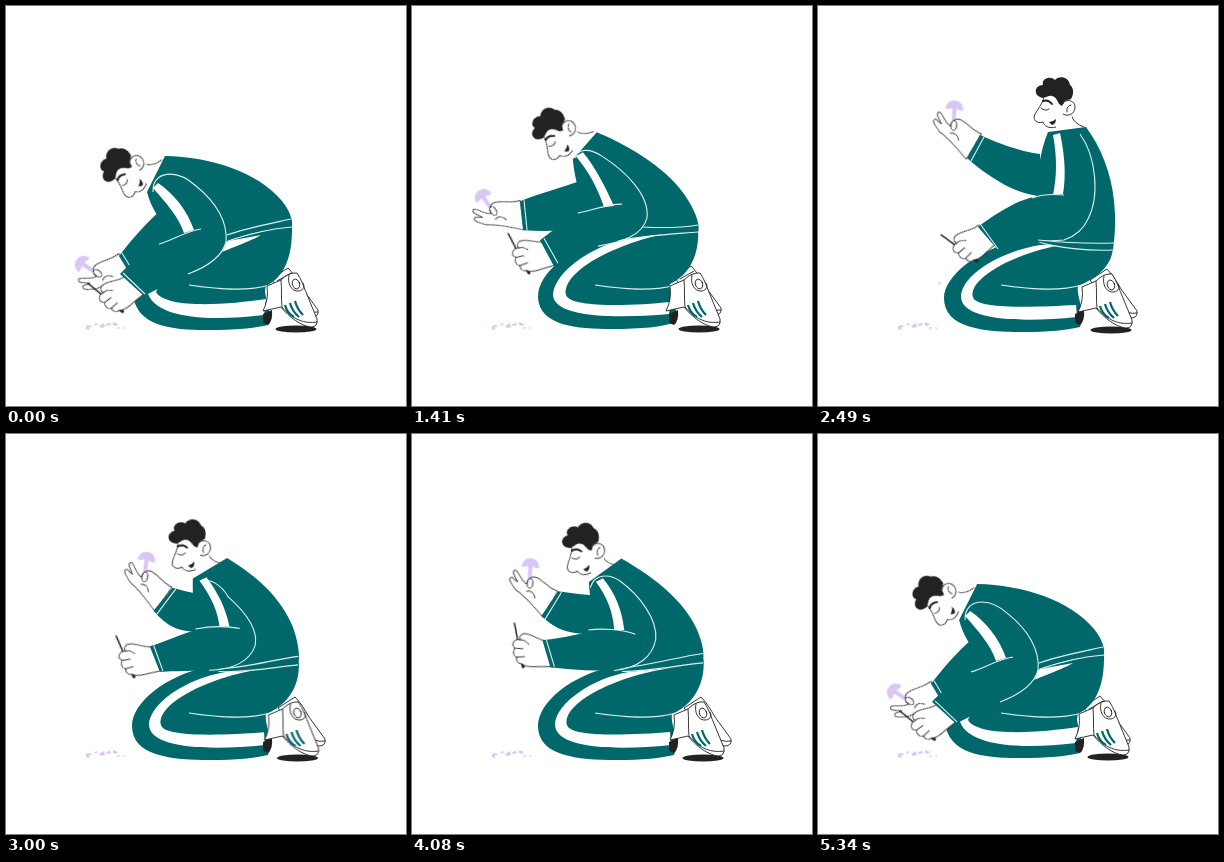
Recreate the animation shown at these times as an HTML page without scripts. Size 400 px wide and 400 px high, loop 5370 ms.

```html
<!DOCTYPE html>
<html lang="en">
<head>
<meta charset="utf-8">
<title>Mushroom picker</title>
<style>
html, body { margin: 0; width: 100%; height: 100%; overflow: hidden; background: #fff; }
svg { display: block; width: 100%; height: 100%; }
.teal { fill: #00686b; }
.ink { fill: #222; }
.lilac { fill: #d9c6f5; }
.white { fill: #fff; }
.skin { fill: #fff; stroke: #222; stroke-width: .9; stroke-linejoin: round; }
.pen { fill: none; stroke: #222; stroke-width: .9; stroke-linecap: round; }
.seam { fill: none; stroke: #dcf0ef; stroke-width: 1.1; }
.move { animation: 5.37s cubic-bezier(.4,0,.6,1) infinite; }
#legs { animation-name: legs; }
#band { animation-name: band; }
#torso { animation-name: torso; }
#hem { animation-name: hem; }
#arm { animation-name: arm; }
#folds { animation-name: folds; }
#sleeve { animation-name: sleeve; }
#far { animation-name: far; }
#cuff { animation-name: cuff; }
#head { animation-name: head; }
#fist { animation-name: fist; }
#palm { animation-name: palm; }
#shoe, #shade { animation-name: shoe; }
#heel { animation-name: heel; }
#chip { animation-name: chip; }

@keyframes legs {
  0%,100% { d: path("M200 240C160 250 127 270 127 288C130 320 165 324 200 324C230 324 250 322 262 319C268 305 256 290 260 280C276 272 287 255 286 218Z") }
  17.3% { d: path("M200 236C160 246 126 270 126 290C128 319 165 323 200 323C230 323 250 321 264 316C268 303 254 288 256 276C274 268 285 250 284 208Z"); animation-timing-function: ease-in }
  26.3% { d: path("M200 232C160 240 126 266 126 291C127 320 165 323 200 323C230 323 250 321 264 316C268 304 256 290 258 278C276 270 288 250 286 222Z"); animation-timing-function: ease-out }
  46.4% { d: path("M200 235C160 243 126 270 126 292C126 322 165 326 205 326C230 326 250 324 262 321C268 305 258 290 260 280C280 272 296 258 295 238Z") }
  60.5%,67% { d: path("M200 233C160 241 126 268 126 292C126 322 165 326 205 326C230 326 250 324 262 321C268 305 258 290 260 280C280 272 294 252 292 225Z") }
  85.5% { d: path("M200 233C160 241 126 268 126 292C126 322 165 326 205 326C230 326 250 324 262 321C268 305 258 290 260 280C278 272 293 252 291 225Z") }
}
@keyframes band {
  0%,100% { d: path("M255 229C238 240 160 262 150 286C160 303 220 299 260 293L258 309C200 316 146 312 141 284C150 262 190 250 222 235Z") }
  17.3% { d: path("M252 222C238 236 160 262 149 287C160 303 220 299 258 294L257 308C200 315 145 312 140 285C150 262 190 248 222 231Z"); animation-timing-function: ease-in }
  26.3% { d: path("M252 228C200 239 150 266 154 289C158 302 220 300 258 296L257 308C200 313 142 311 141 289C142 266 180 240 214 233Z"); animation-timing-function: ease-out }
  46.4% { d: path("M256 237C200 244 150 272 155 291C158 304 220 301 258 299L259 311C200 317 144 314 143 291C143 270 180 246 222 239Z") }
  60.5%,85.5% { d: path("M258 234C200 243 150 270 155 291C158 304 220 301 258 298L259 311C200 317 144 314 143 291C143 270 180 244 217 238Z") }
}
@keyframes torso {
  0%,100% { d: path("M141 186L159 150C205 151 252 166 276 195C284 205 287 214 286 221C262 223 245 227 218 236C180 245 150 220 141 186Z") }
  17.3% { d: path("M134 200L145 158C195 155 248 168 274 191C284 200 285 207 283 213C262 218 245 225 218 232C180 245 150 225 134 200Z"); animation-timing-function: ease-in }
  26.3% { d: path("M161 153L185 126C230 145 262 170 276 194C286 210 288 222 286 226C262 228 240 226 205 236C175 220 163 180 161 153Z"); animation-timing-function: ease-out }
  46.4% { d: path("M230 126L268 121C282 140 293 165 296 195C298 215 297 228 295 244C270 245 245 242 221 236C215 200 218 155 230 126Z") }
  60.5%,67% { d: path("M174 150L207 125C245 145 270 165 284 192C292 210 293 222 291 228C265 230 240 238 207 238C185 215 176 180 174 150Z") }
  85.5% { d: path("M180 146L212 124C250 148 272 170 284 195C292 212 292 222 290 231C265 234 240 236 210 237C188 215 182 180 180 146Z") }
}
@keyframes hem {
  0%,100% { d: path("M221 229C240 222 262 218 285 213M222 235C245 227 262 223 286 221") }
  17.3% { d: path("M224 223C245 219 262 211 282 206M224 231C245 225 262 218 283 213"); animation-timing-function: ease-in }
  26.3% { d: path("M231 221C250 222 268 222 286 219M205 235C235 229 262 228 286 226"); animation-timing-function: ease-out }
  46.4% { d: path("M219 234C240 236 268 238 296 237M221 236C240 242 270 245 295 244") }
  60.5%,67% { d: path("M207 235C240 234 265 222 291 218M210 238C240 238 265 230 291 227") }
  85.5% { d: path("M207 234C240 228 265 224 291 221M210 237C240 236 265 233 291 231") }
}
@keyframes arm {
  0%,100% { d: path("M147 184C150 150 216 175 219 228C226 255 190 262 138 290L114 268C130 250 160 235 180 229C160 222 150 200 147 184Z") }
  17.3% { d: path("M138 194C150 162 220 186 222 226C226 258 190 266 138 292L116 268C130 252 165 234 185 228C165 222 150 212 138 194Z"); animation-timing-function: ease-in }
  26.3% { d: path("M163 152C172 128 240 185 235 212C228 236 180 238 142 260L128 234C145 222 160 208 178 205C168 190 162 170 163 152Z"); animation-timing-function: ease-out }
  46.4% { d: path("M232 130C275 118 290 215 262 228C240 240 210 232 180 244L160 221C175 210 200 192 222 190C218 170 222 150 232 130Z") }
  60.5%,67% { d: path("M177 155C185 130 250 170 250 205C246 240 190 237 146 236L139 210C160 205 178 198 192 195C182 185 177 170 177 155Z") }
  85.5% { d: path("M180 152C188 128 238 170 237 205C232 244 180 240 130 230L121 202C145 203 165 200 182 195C178 182 177 166 180 152Z") }
}
@keyframes folds {
  0%,100% { d: path("M147 186C146 165 170 162 190 180C210 196 222 216 220 236C216 252 198 262 182 268M153 238C165 235 180 225 195 223M117 267L139 288") }
  17.3% { d: path("M138 192C142 172 172 175 192 186C212 197 224 210 224 230C220 246 205 256 186 264M158 237C170 234 185 224 200 220M119 266L141 289"); animation-timing-function: ease-in }
  26.3% { d: path("M163 152C166 142 178 142 190 150C215 166 238 190 235 212C230 230 210 236 186 240M166 207C180 204 195 198 210 198M132 232L146 257"); animation-timing-function: ease-out }
  46.4% { d: path("M262 128C278 150 282 190 270 213C265 224 255 231 246 234C235 235 228 235 220 234M214 192C225 188 235 188 246 189M163 219L180 243") }
  60.5%,67% { d: path("M177 155C180 140 196 140 208 148C230 163 252 185 250 205C247 224 228 236 198 237M182 196C195 194 215 193 230 196M143 209L150 235") }
  85.5% { d: path("M180 152C184 140 198 138 208 146C226 160 238 186 237 205C234 222 222 233 206 236M170 196C185 194 205 198 216 205M125 203L134 230") }
}
@keyframes sleeve {
  0%,100% { d: path("M147 182L152 177C168 188 181 204 188 224L178 227C172 210 161 198 147 182Z") }
  17.3% { d: path("M138 193L143 187C163 194 180 204 189 219L179 224C170 211 157 204 138 193Z"); animation-timing-function: ease-in }
  26.3% { d: path("M164 150L171 146C183 160 194 182 202 200L192 201C186 182 176 164 164 150Z"); animation-timing-function: ease-out }
  46.4% { d: path("M235 129L242 127C247 150 248 170 245 188L235 189C239 170 239 150 235 129Z") }
  60.5%,67% { d: path("M181 152L188 148C203 163 212 178 217 194L207 194C204 180 195 166 181 152Z") }
  85.5% { d: path("M187 143L194 140C204 155 208 175 207 198L197 198C198 178 196 160 187 143Z") }
}
@keyframes far {
  0%,100% { d: path("M160 200C145 212 130 228 113 250L122 264C150 250 165 240 180 230Z") }
  17.3% { d: path("M160 205C150 222 130 238 115 258L123 271C150 250 170 240 180 230Z"); animation-timing-function: ease-in }
  26.3% { d: path("M175 172C155 180 130 186 108 195L111 224C140 226 165 226 190 210Z"); animation-timing-function: ease-out }
  34.1% { d: path("M225 148C200 132 175 108 152 88L130 112C160 150 195 172 225 180Z") }
  46.4% { d: path("M222 148C200 145 180 137 162 129L149 152C175 175 200 188 222 190Z") }
  60.5%,67% { d: path("M200 165C190 165 178 163 168 161L147 184C155 195 165 205 195 198Z") }
  85.5% { d: path("M185 160C165 157 140 155 122 153L110 180C130 195 150 200 185 200Z") }
}
@keyframes cuff {
  0%,100% { d: path("M116 247L125 262") }
  17.3% { d: path("M118 254L127 267"); animation-timing-function: ease-in }
  26.3% { d: path("M112 194L115 224"); animation-timing-function: ease-out }
  34.1% { d: path("M155 91L133 116") }
  46.4% { d: path("M166 131L153 155") }
  60.5%,67% { d: path("M171 162L150 188") }
  85.5% { d: path("M126 154L114 183") }
}
@keyframes head {
  0%,100% { transform: translate(131px,157px) rotate(-57deg) }
  17.3% { transform: translate(118px,169px) rotate(-84deg); animation-timing-function: ease-in }
  26.3% { transform: translate(157px,122px) rotate(-42deg); animation-timing-function: ease-out }
  46.4% { transform: translate(250px,102px) }
  60.5%,67% { transform: translate(182px,118px) rotate(-15deg) }
  85.5% { transform: translate(190px,116px) rotate(-15deg) }
}
@keyframes fist {
  0%,100% { transform: translate(126px,279px) rotate(-43deg) }
  17.3% { transform: translate(134px,278px) rotate(-30deg); animation-timing-function: ease-in }
  26.3% { transform: translate(136px,246px) rotate(-20deg); animation-timing-function: ease-out }
  46.4% { transform: translate(167px,228px) rotate(-46deg) }
  60.5%,67% { transform: translate(143px,222px) rotate(-7deg) }
  85.5% { transform: translate(127px,214px) }
}
@keyframes palm {
  0%,100% { transform: translate(119px,261px) rotate(-53deg) }
  17.3% { transform: translate(122px,266px) rotate(-68deg); animation-timing-function: ease-in }
  26.3% { transform: translate(109px,209px) rotate(-31deg); animation-timing-function: ease-out }
  34.1% { transform: translate(140px,100px) rotate(5deg) }
  46.4% { transform: translate(155px,140px) rotate(7deg) }
  60.5%,67% { transform: translate(157px,172px) rotate(12deg) }
  85.5% { transform: translate(116px,167px) }
}
@keyframes shoe {
  0%,100% { transform: translate(-1px,-1px) }
  17.3%,26.3% { transform: translate(-4px,-1px) }
  46.4% { transform: translate(2px,0) }
  60.5%,85.5% { transform: none }
}
@keyframes heel {
  0%,100% { transform: translate(-7px,-1px) }
  17.3%,26.3% { transform: translate(-10px,-3px) }
  46.4%,85.5% { transform: none }
}
@keyframes chip {
  0%,41% { transform: translate(126px,190px); opacity: 0; animation-timing-function: step-end }
  41.1% { transform: translate(126px,200px); opacity: 1; animation-timing-function: ease-in }
  48% { transform: translate(119px,320px); opacity: 1; animation-timing-function: step-start }
  48.1%,100% { transform: translate(119px,320px); opacity: 0 }
}
</style>
</head>
<body>
<svg viewBox="0 0 400 400">
  <g class="lilac">
    <path d="M80 320l4-1 2 2-3 0 0 3-3-1zM88 318l4-1-2 3zM93 320l5-3 1 4-4 1zM100 318l4-1 1 2-4 1zM107 316l5 2-2 2-3-1zM110 322l4-1-1 2zM117 321l3 1-2 1z"/>
    <circle id="chip" class="move" r="1.2"/>
  </g>
  <ellipse id="shade" class="ink move" cx="291" cy="324" rx="20.5" ry="3.6"/>

  <g id="heel" class="move">
    <path class="skin" d="M272 274L289 263C295 269 299 276 303 283L319 305Q320 312 313 312L299 308Z"/>
    <path class="pen" d="M300 301Q309 309 319 307M278 276L292 268"/>
  </g>
  <path id="legs" class="teal move"/>
  <path id="band" class="white move"/>
  <path class="seam" d="M183 279C210 283 240 286 264 279"/>
  <path class="ink" d="M257 308L266 304Q267 315 262 319L257 317Z"/>

  <g id="shoe" class="move">
    <path class="skin" d="M262 281L276 275Q284 267 292 268C297 275 299 283 303 292L312 314Q313 322 306 322C296 321 284 312 276 302L258 306Q264 294 262 281Z"/>
    <path class="pen" d="M276 275C277 284 276 294 277 302C288 315 300 319 312 317M284 270C282 278 286 287 294 286C299 285 300 281 298 278"/>
    <ellipse class="pen" cx="291" cy="279" rx="3.6" ry="5" transform="rotate(-20 291 279)"/>
    <path fill="none" stroke="#00686b" stroke-width="2.2" d="M280 300q2 8 9 12M285 298q2 8 9 14M290 296q2 8 8 14"/>
  </g>

  <g id="palm" class="move">
    <g class="lilac">
      <path d="M-32 -34Q-31 -43 -23 -43T-14 -34Q-18 -33 -20 -35Q-23 -32 -26 -35Q-29 -33 -32 -34Z"/>
      <path d="M-25 -36h4l1 18h-4z"/>
    </g>
    <path class="skin" d="M7 -13C-4 -16 -10 -24 -18 -25Q-24 -24 -25 -17L-29 -20L-36 -29Q-40 -31 -39 -26L-34 -18L-40 -22Q-44 -22 -41 -17L-35 -10C-24 -4 -14 6 -5 14Z"/>
    <ellipse class="skin" cx="-21.5" cy="-18" rx="2.8" ry="4.8"/>
    <path class="pen" d="M-24 -10Q-17 -12 -15 -4"/>
  </g>
  <path id="far" class="teal move"/>
  <path id="cuff" class="seam move"/>

  <g id="head" class="move">
    <path class="white" d="M-10 14L-12 34L18 30L5 4Z"/>
    <path class="pen" d="M3 7Q6 16 16 19"/>
    <path class="skin" d="M-24 -10C-26 -4 -30 1 -33 6C-36 12 -31 16 -25 14C-24 18 -19 21 -12 19"/>
    <path class="white" d="M-24 -11L2 -10L4 10L-12 18L-22 14Z"/>
    <path class="ink" d="M3 -9C6 -14 6 -20 2 -23C1 -31 -9 -33 -13 -28C-18 -33 -27 -29 -25 -23C-33 -23 -35 -14 -28 -11C-24 -8 -20 -13 -16 -12C-12 -11 -11 -8 -9 -4L-6 -2L-3 -7Z"/>
    <path class="skin" d="M-5 -4C-4 -9 7 -9 7 -1C7 6 0 9 -5 6"/>
    <path class="pen" d="M-1 4Q-2 -2 3 -3M-27 0q4 4 8 1"/>
    <path class="pen" style="stroke-width:2" d="M-25 -7q5 -2 9 3"/>
    <path class="ink" d="M-19 14Q-15 14 -12 11Q-12 16 -16 17Z"/>
  </g>

  <path id="torso" class="teal move"/>
  <path id="hem" class="seam move"/>

  <g id="fist" class="move">
    <path class="pen" style="stroke-width:1.5" d="M-31 -31L-28 -8"/>
    <path class="pen" style="stroke-width:3" d="M-27 0L-25 13"/>
    <path class="skin" d="M2 -11C-7 -11 -14 -20 -23 -20Q-28 -18 -26 -14C-34 -16 -36 -9 -32 -6C-35 -3 -34 2 -31 3C-32 8 -29 10 -26 10C-22 15 -10 13 5 15Z"/>
    <path class="pen" d="M-26 -14Q-21 -14 -18 -9M-32 -6L-24 -5M-31 3L-23 3"/>
  </g>
  <path id="arm" class="teal move"/>
  <path id="sleeve" class="white move"/>
  <path id="folds" class="seam move"/>
</svg>
</body>
</html>
```
